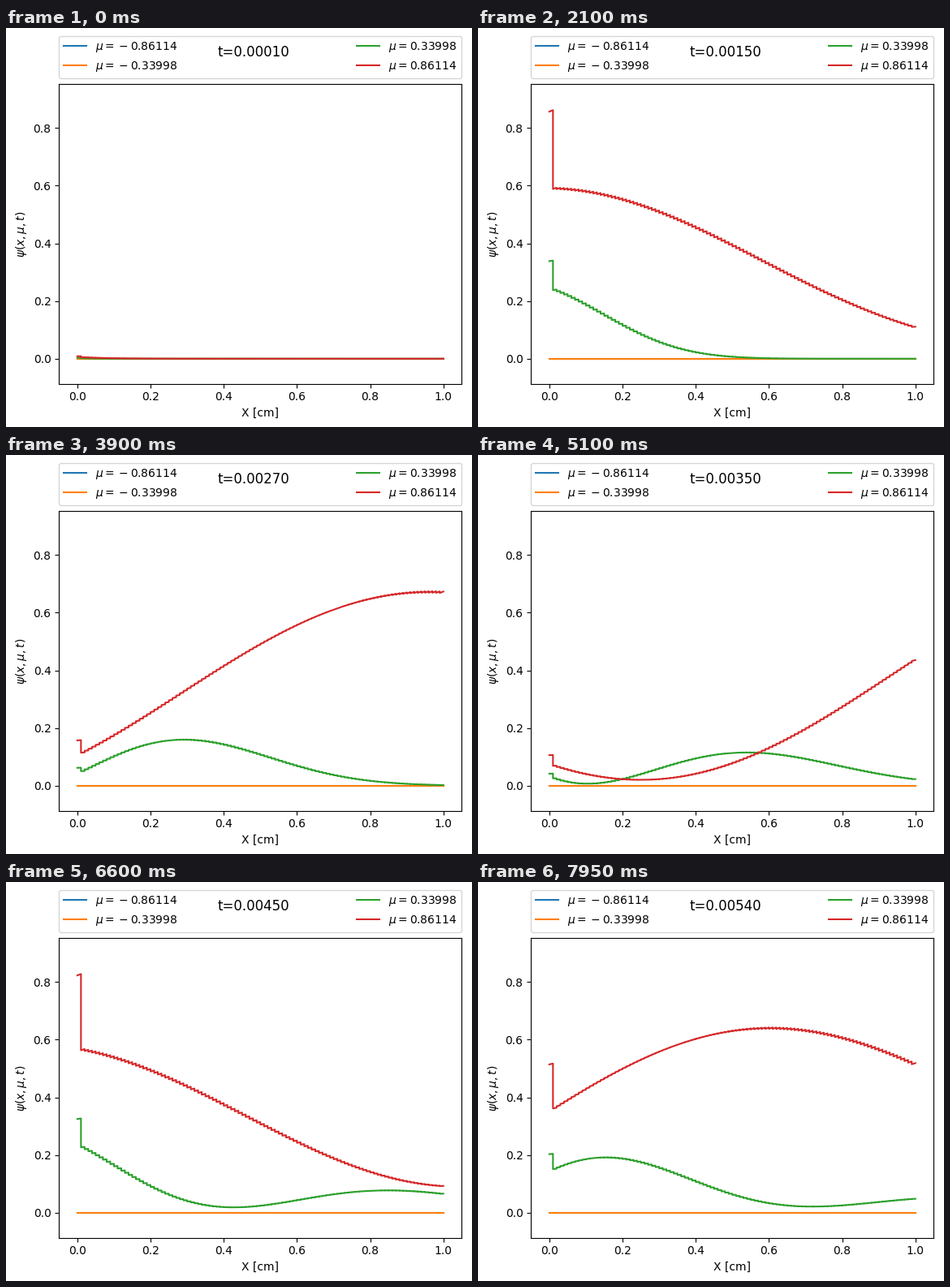
Animation, 574 px wide and 492 px high, one loop 8 s. Source, as a matplotlib script:

```python
import numpy as np
import matplotlib.pyplot as plt
from matplotlib.animation import FuncAnimation

W, H, DPI = 574, 492, 100
INTERVAL, LOOP, HOLD = 50, 8000, 3

# Transport of a pulsed boundary flux through a slab, backward Euler in time
CELLS, DT, SPEED, PULSE = 100, 1e-4, 925.0, 1000.0
STEPS = -(-LOOP // (INTERVAL * HOLD))
MUS = (-0.86114, -0.33998, 0.33998, 0.86114)
# direction: (transmission into the slab, effective absorption)
MEDIUM = {0.33998: (0.72, 0.35), 0.86114: (0.69, -0.215)}
EDGE_TILT, CELL_TILT = 0.0057, 0.0075

edges = np.linspace(0, 1, CELLS + 1)
x = np.column_stack((edges[:-1], edges[1:])).ravel()


def solve(mu):
    """Return one row of cell end values per time step."""
    rows = np.zeros((STEPS, 2 * CELLS))
    if mu < 0:
        return rows
    gain, absorption = MEDIUM[mu]
    stream = mu * CELLS
    inertia = 1 / (SPEED * DT)
    loss = (inertia + absorption) / 2
    psi = np.zeros(CELLS)
    for step in range(STEPS):
        inflow = mu * np.sin(PULSE * DT * (step + 1)) ** 2
        old, psi = psi, np.zeros(CELLS)
        psi[0] = gain * inflow
        for i in range(1, CELLS):
            memory = inertia / 2 * (old[i] + old[i - 1])
            psi[i] = ((stream - loss) * psi[i - 1] + memory) / (stream + loss)
        ends = np.outer(psi, (1 - CELL_TILT / 2, 1 + CELL_TILT / 2))
        ends[0] = inflow, inflow * (1 + EDGE_TILT)
        rows[step] = ends.ravel()
    return rows


flux = [solve(mu) for mu in MUS]
peak = MUS[-1] * (1 + EDGE_TILT)

fig = plt.figure(figsize=(W / DPI, H / DPI), dpi=DPI)
ax = fig.add_axes((65.3 / W, 53.4 / H, 496 / W, 369.6 / H))
lines = [ax.plot(x, rows[0], label=rf"$\mu={mu:.5f}$")[0]
         for mu, rows in zip(MUS, flux)]
ax.set_xlim(-0.05, 1.05)
ax.set_ylim(-0.1 * peak, 1.1 * peak)
ax.set_xlabel("X [cm]")
ax.set_ylabel(r"$\psi(x,\mu,t)$")
ax.legend(bbox_to_anchor=(0, 1.02, 1, 0.102), loc="lower left",
          ncol=2, mode="expand", borderaxespad=0)
clock = fig.text(305.3 / W, 1 - 21 / H, "", fontsize=12, ha="center", va="top")


def update(frame):
    step = frame // HOLD
    for line, rows in zip(lines, flux):
        line.set_ydata(rows[step])
    clock.set_text(f"t={DT * (step + 1):.5f}")
    return (*lines, clock)


anim = FuncAnimation(fig, update, frames=LOOP // INTERVAL, interval=INTERVAL,
                     repeat=True, repeat_delay=0)
plt.show()
```
